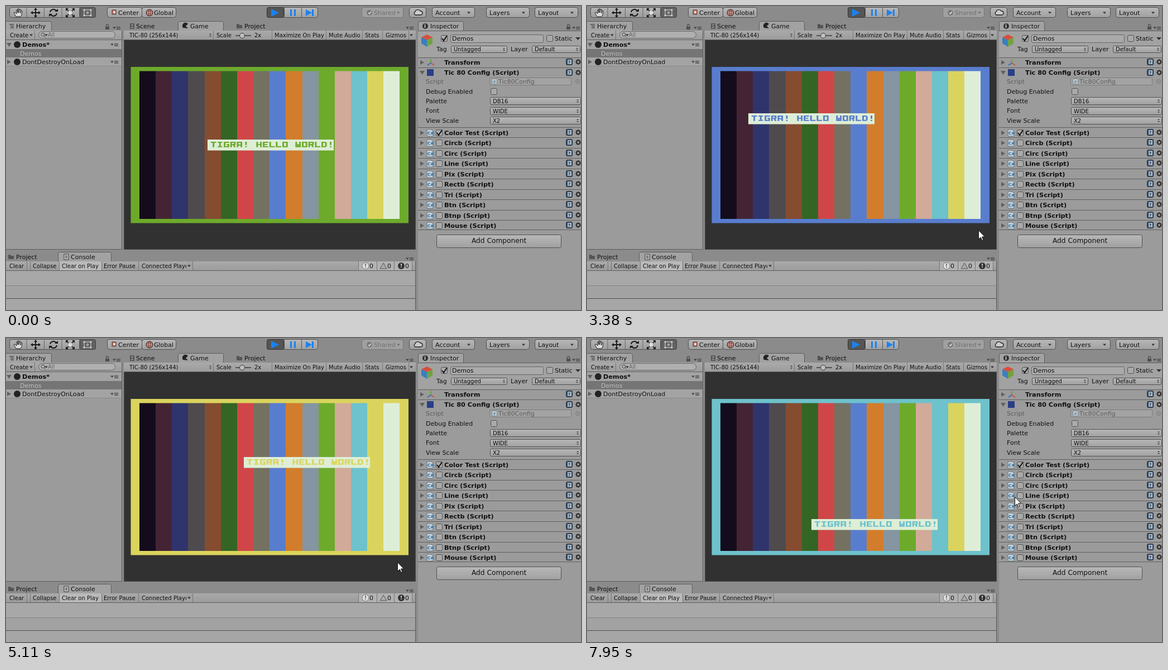
Write an HTML page with a canvas that moves like this. It is 1030 px wide and 544 px high and loops after 8 s.

```html
<!DOCTYPE html>
<html lang="en">
<head>
<meta charset="utf-8">
<title>Editor colour test</title>
<style>
html, body { margin: 0; width: 1030px; height: 544px; overflow: hidden; background: #8b8b8b; }
canvas { position: absolute; left: 0; top: 0; }
</style>
</head>
<body>
<canvas id="ui" width="1030" height="544"></canvas>
<canvas id="live" width="1030" height="544"></canvas>
<script>
const ui = document.getElementById('ui').getContext('2d');
const live = document.getElementById('live').getContext('2d');
const INK = '#101010', EDGE = '#5c5c5c', PANEL = '#9b9b9b';

// ---------- drawing helpers for the static editor ----------
function rect(x, y, w, h, fill) { ui.fillStyle = fill; ui.fillRect(x, y, w, h); }

function round(x, y, w, h, r, fill, edge) {
  ui.beginPath();
  ui.roundRect(x + .5, y + .5, w - 1, h - 1, r);
  if (fill) { ui.fillStyle = fill; ui.fill(); }
  if (edge) { ui.strokeStyle = edge; ui.lineWidth = 1; ui.stroke(); }
}

function text(s, x, y, size = 11, color = INK, weight = '') {
  ui.font = `${weight} ${size}px "DejaVu Sans", sans-serif`;
  ui.fillStyle = color;
  ui.fillText(s, x, Math.round(y + size * .36));
}
const bold = (s, x, y) => text(s, x, y, 11.3, INK, 'bold');

function path(d, x, y, fill, edge, width = 1) {
  ui.save();
  ui.translate(x, y);
  const p = new Path2D(d);
  if (fill) { ui.fillStyle = fill; ui.fill(p); }
  if (edge) { ui.strokeStyle = edge; ui.lineWidth = width; ui.stroke(p); }
  ui.restore();
}

function disc(x, y, r, fill, edge, width = 1) {
  path(`M${r} 0A${r} ${r} 0 1 1 ${-r} 0A${r} ${r} 0 1 1 ${r} 0Z`, x, y, fill, edge, width);
}

function shade(y, h, top, bottom) {
  const g = ui.createLinearGradient(0, y, 0, y + h);
  g.addColorStop(0, top);
  g.addColorStop(1, bottom);
  return g;
}
const button = (x, y, w, h, r = 3) => round(x, y, w, h, r, shade(y, h, '#b8b8b8', '#a0a0a0'), '#505050');
const down = (x, y, c = '#333') => path('M-3 -1.5H3L0 2Z', x, y, c);
const right = (x, y) => path('M-3 -4L4 0L-3 4Z', x, y, '#606060');
const unfold = (x, y) => path('M-4 -3H5L.5 4Z', x, y, '#606060');
const upDown = (x, y) => path('M-2 -1L0 -3L2 -1ZM-2 1L0 3L2 1Z', x, y, '#333');

function popup(s, x, y, w, h = 13) {
  button(x, y, w, h, 2);
  text(s, x + 5, y + h / 2, 10);
  upDown(x + w - 6, y + h / 2);
}
function menu(x, y) {
  down(x - 5, y, '#444');
  path('M0 -2H7M0 0H7M0 2H7', x - 1, y + .5, null, '#444');
}
function lock(x, y) {
  rect(x - 3, y, 7, 5, '#505050');
  path('M-2 0V-2A2 2 0 0 1 2 -2V0', x + .5, y, null, '#505050', 1.3);
}
function folder(x, y) { path('M-5 4V-4H-1L0 -2H5V4Z', x, y, '#555'); }

function tab(x, w, y) { round(x, y, w, 19, [3, 3, 0, 0], '#a2a2a2', EDGE); }
function bar(x, y, w) {
  rect(x, y, w, 16, shade(y, 16, '#aaaaaa', '#9c9c9c'));
  rect(x, y + 16, w, 1, EDGE);
}
function check(x, y, on) {
  round(x, y, 12, 12, 2, '#aaaaaa', '#505050');
  if (on) path('M2 5L5 9L11 0', x, y + 1, null, '#111', 2);
}
function gear(x, y) {
  disc(x, y, 3, null, '#303030', 2);
  path('M0 -5V-3M0 3V5M-5 0H-3M3 0H5M-3.5 -3.5L-2 -2M2 2L3.5 3.5M-3.5 3.5L-2 2M2 -2L3.5 -3.5', x, y, null, '#303030', 1.6);
}
function rowEnd(y) {
  round(1003, y - 6, 12, 12, 2, '#344b66', '#25303c');
  rect(1006, y - 4, 7, 8, '#a8b9c8');
  text('?', 1007, y, 7, '#203040', 'bold');
  gear(1025, y);
}
function script(x, y) {
  path('M-5 -6H3L6 -3V6H-5Z', x, y, '#c4d0d8', '#65737c');
  text('C#', x - 4, y + .5, 7, '#1764a0', 'bold');
}

function drawToolbar() {
  const x = 6;
  round(x, 2, 155, 19, 4, shade(2, 19, '#b4b4b4', '#9c9c9c'), '#505050');
  round(132, 2, 29, 19, 3, '#626262', '#404040');
  for (let i = 1; i < 5; i++) rect(5 + i * 31.5, 3, 1, 17, '#666');
  path('M-4 7L-8 0L-6 -1L-3 2V-5L-1 -5V0V-7L1 -7V0L2 -6H4V1L5 -4L7 -3L6 4L4 7Z', 22, 12, '#ddd', '#222');
  path('M0 -7V7M-7 0H7', 53, 12, null, '#181818', 1.8);
  path('M0 -9L3 -5H-3ZM0 9L3 5H-3ZM-9 0L-5 -3V3ZM9 0L5 -3V3Z', 53, 12, '#181818');
  path('M-6 -1A6 6 0 0 1 5 -3M6 1A6 6 0 0 1 -5 3', 85, 12, null, '#181818', 2);
  path('M2 -2H8V-7ZM-2 2H-8V7Z', 85, 12, '#181818');
  path('M-6 -6L6 6M6 -6L-6 6', 115, 12, null, '#181818', 1.5);
  path('M-8 -8H-3L-8 -3ZM8 -8H3L8 -3ZM-8 8H-3L-8 3ZM8 8H3L8 3Z', 115, 12, '#181818');
  rect(112, 9, 6, 6, '#ddd');
  path('M-6 -5H6V5H-6Z', 146, 12, null, '#ddd');
  for (const i of [-6, 6]) for (const j of [-5, 5]) disc(146 + i, 12 + j, 1.5, '#ddd');
  disc(146, 12, 1.5, null, '#ddd');

  button(181, 2, 63, 19, 4);
  button(243, 2, 62, 19, 4);
  path('M-4 -4H3V4H-4Z', 194, 11, '#d36b57', '#444');
  disc(194, 11, 2, '#eee');
  text('Center', 201, 12);
  disc(257, 12, 6, '#8c5149', '#333');
  path('M-5 0H5M0 -5V5M-3 -4Q-5 0 -3 4M3 -4Q5 0 3 4', 257, 12, null, '#d5a49d');
  text('Global', 265, 12);

  button(467, 2, 92, 19, 4);
  round(467, 2, 31, 19, 3, '#555', '#333');
  rect(498, 3, 1, 17, '#555');
  rect(529, 3, 1, 17, '#555');
  path('M-6 -7L8 0L-6 7Z', 481, 12, '#1982f0');
  path('M-5 -6H-2V6H-5ZM2 -6H5V6H2Z', 514, 12, '#1982f0');
  path('M-7 -6L4 0L-7 6ZM4 -6H7V6H4Z', 544, 12, '#1982f0');

  round(637, 2, 75, 19, 4, '#a0a0a0', '#777');
  disc(651, 12, 5, '#777');
  path('M-2 0L0 2L3 -2', 651, 12, null, '#ddd', 1.5);
  text('Shared', 659, 12, 11, '#707070');
  down(703, 12, '#707070');
  button(722, 2, 31, 19, 4);
  path('M-5 4A3.5 3.5 0 0 1 -5 -2A5 5 0 0 1 4 -3A3.5 3.5 0 0 1 5 4Z', 738, 12, '#ccc', '#222', 1.4);
  for (const [s, bx, w] of [['Account', 763, 77], ['Layers', 860, 78], ['Layout', 947, 78]]) {
    button(bx, 2, w, 19, 4);
    text(s, bx + 6, 12);
    down(bx + w - 11, 12);
  }
}

function drawHierarchy() {
  rect(0, 44, 208, 392, PANEL);
  tab(-4, 86, 27);
  path('M0 -3H8M2 0H8M2 3H8', 6, 36, null, '#222');
  text('Hierarchy', 18, 36);
  lock(181, 37);
  menu(199, 39);
  bar(0, 44, 208);
  text('Create', 7, 52, 10);
  down(45, 52);
  rect(51, 44, 1, 16, '#777');
  round(58, 45, 138, 13, 6, '#b0b0b0', '#666');
  disc(66, 51, 3, null, '#444');
  path('M2 2L5 5', 66, 51, null, '#444');
  down(72, 52);
  text('All', 75, 51, 10, '#666');
  rect(0, 61, 208, 16, '#a3a3a3');
  rect(0, 77, 208, 15, '#757575');
  rect(0, 92, 208, 16, '#a3a3a3');
  rect(0, 107, 208, 1, '#898989');
  unfold(5, 69);
  right(5, 100);
  disc(20, 69, 6, '#222');
  disc(20, 100, 6, '#222');
  bold('Demos*', 29, 69);
  text('Demos', 25, 85, 11, '#bdbdbd');
  text('DontDestroyOnLoad', 29, 100);
  menu(195, 69);
  menu(195, 100);
  rect(207, 44, 1, 392, EDGE);
  rect(0, 435, 208, 1, EDGE);
}

function drawGameWindow() {
  tab(308, 82, 27);
  path('M-4 -4H4M-4 0H4M-4 4H4M-3 -4V4M3 -4V4', 226, 36, null, '#333');
  text('Scene', 233, 36);
  path('M-5 3A5 5 0 1 1 4 -4L0 0L4 4Z', 322, 36, '#222');
  text('Game', 330, 36);
  folder(418, 36);
  text('Project', 427, 36);
  menu(724, 39);
  bar(211, 44, 523);
  text('TIC-80 (256x144)', 221, 52, 10);
  upDown(366, 52);
  text('Scale', 377, 52, 10);
  rect(411, 52, 28, 2, '#555');
  disc(423, 53, 4.5, '#c0c0c0', '#333');
  text('2x', 445, 52, 10);
  text('Maximize On Play', 481, 52, 10);
  text('Mute Audio', 578, 52, 10);
  text('Stats', 643, 52, 10);
  text('Gizmos', 680, 52, 10);
  down(726, 52);
  for (const x of [371, 476, 573, 638, 674, 721]) rect(x, 44, 1, 16, '#777');
  rect(211, 61, 523, 375, '#4b4b4b');
  rect(212, 61, 521, 374, '#313131');
}

function drawConsole() {
  tab(93, 96, 440);
  folder(9, 449);
  text('Project', 18, 449);
  path('M-4 -5H4V5H-4ZM-2 -2H2M-2 0H2M-2 2H2', 108, 449, '#ccc', '#333');
  text('Console', 116, 449);
  menu(724, 452);
  bar(0, 457, 734);
  rect(96, 457, 75, 16, '#bababa');
  [['Clear', 6], ['Collapse', 48], ['Clear on Play', 100], ['Error Pause', 175], ['Connected Playe', 243]]
    .forEach(([s, x]) => text(s, x, 465, 10));
  rect(323, 458, 11, 14, '#a2a2a2');
  down(328, 465);
  for (const x of [37, 43, 95, 171, 237, 334, 631, 664, 696, 727]) rect(x, 457, 1, 16, '#777');
  rect(632, 457, 95, 16, '#b2b2b2');
  for (const x of [664, 695]) rect(x, 457, 1, 16, '#777');
  disc(644, 465, 6, '#ddd', '#777');
  text('!', 642, 465, 9, '#555', 'bold');
  path('M0 -5L6 5H-6Z', 676, 465, '#aaa', '#555');
  disc(708, 465, 6, '#333');
  text('!', 706, 465, 9, '#eee', 'bold');
  for (const x of [651, 683, 715]) text('0', x, 465);
  rect(0, 474, 734, 26, '#a8a8a8');
  rect(0, 500, 734, 24, '#a2a2a2');
  rect(0, 524, 734, 20, '#a6a6a6');
  rect(0, 500, 734, 1, '#858585');
  rect(0, 523, 734, 1, '#4f4f4f');
  rect(733, 457, 1, 87, EDGE);
}

function drawInspector() {
  rect(738, 44, 292, 500, PANEL);
  tab(738, 82, 27);
  disc(751, 36, 5, '#303030');
  text('i', 749, 36, 9, '#ddd', 'bold');
  text('Inspector', 760, 36);
  lock(1007, 37);
  menu(1022, 39);
  rect(738, 44, 292, 48, '#a2a2a2');
  rect(738, 44, 292, 1, EDGE);
  path('M0 -11L10 -6L0 -1L-10 -6Z', 754, 62, '#d64f3e');
  path('M-10 -6L0 -1V11L-10 5Z', 754, 62, '#397fc0');
  path('M10 -6L0 -1V11L10 5Z', 754, 62, '#70a340');
  check(779, 52, true);
  round(796, 51, 167, 15, 2, '#aaaaaa', '#666');
  text('Demos', 799, 58);
  check(968, 52);
  text('Static', 983, 58);
  path('M-4 -2H5L.5 3Z', 1024, 58, '#333');
  text('Tag', 771, 77);
  popup('Untagged', 797, 71, 101);
  text('Layer', 904, 77);
  popup('Default', 942, 71, 87);

  const line = y => rect(738, y, 292, 1, '#5f5f5f');
  line(92);
  line(110);
  right(745, 101);
  path('M0 1V-6', 761, 101, null, '#62a436', 2);
  path('M0 1L-6 5', 761, 101, null, '#366bc0', 2);
  path('M0 1L6 5', 761, 101, null, '#c55839', 2);
  bold('Transform', 785, 101);
  rowEnd(100);
  unfold(745, 119);
  rect(754, 113, 12, 12, '#293e86');
  bold('Tic 80 Config (Script)', 785, 119);
  rowEnd(119);

  text('Script', 752, 135, 11, '#5d5d5d');
  round(866, 128, 147, 14, 2, '#a3a3a3', '#7b7b7b');
  round(870, 130, 10, 10, 1, '#c1ccd2', '#718591');
  text('#', 872, 135, 7, '#426f91');
  text('Tic80Config', 882, 135, 11, '#5d5d5d');
  disc(1024, 135, 3.5, null, '#777');
  disc(1024, 135, 1, '#777');
  text('Debug Enabled', 752, 153);
  check(868, 147);
  [['Palette', 'DB16'], ['Font', 'WIDE'], ['View Scale', 'X2']].forEach(([label, value], i) => {
    const y = 170 + i * 17.5;
    text(label, 752, y);
    popup(value, 867, Math.round(y - 7), 163, 14);
  });

  ['Color Test', 'Circb', 'Circ', 'Line', 'Pix', 'Rectb', 'Tri', 'Btn', 'Btnp', 'Mouse'].forEach((name, i) => {
    const y = Math.round(227 + i * 18.45);
    line(y - 10);
    right(745, y);
    script(759, y);
    check(770, y - 6, i === 0);
    bold(name + ' (Script)', 785, y);
    rowEnd(y - 1);
  });
  line(400);
  button(771, 409, 224, 24, 3);
  text('Add Component', 834, 420, 12.2);
}

rect(0, 0, 1030, 544, '#8b8b8b');
drawToolbar();
drawHierarchy();
drawGameWindow();
drawConsole();
drawInspector();

// ---------- game screen and pointer ----------
const PALETTE = ['#140c1c', '#442434', '#30346d', '#4e4a4e', '#854c30', '#346524', '#d04648', '#757161',
  '#597dce', '#d27d2c', '#8595a1', '#6daa2c', '#d2aa99', '#6dc2cb', '#dad45e', '#deeed6'];
const LEFT = 223.5, TOP = 109, UNIT = 497.5 / 256;

// Letter strokes, five units tall; the pen is wider across than down.
const GLYPHS = {
  T: 'M0 .5H3.3M1.65 0V5', I: 'M.3 .5H3M1.65 0V5M.3 4.5H3',
  G: 'M3.3 .5H.5V4.5H2.8V2.5H1.7', R: 'M.5 5V.5H2.8V2.5H.5M2 2.5L2.8 5',
  A: 'M.5 5V.5H2.8V5M.5 3H2.8', '!': 'M1.65 0V3M1.65 4V5',
  H: 'M.5 0V5M2.8 0V5M.5 2.5H2.8', E: 'M3.3 .5H.5V4.5H3.3M.5 2.5H2.8',
  L: 'M.5 0V4.5H3.3', O: 'M.5 .5H2.8V4.5H.5Z',
  W: 'M.5 0V4.5H2.8V0M1.65 2V4.5', D: 'M.5 .5H2.2L2.8 1.2V3.8L2.2 4.5H.5Z'
};
for (const k in GLYPHS) GLYPHS[k] = new Path2D(GLYPHS[k]);
const ARROW = new Path2D('M.5 .5V16.5L4.2 13L6.8 18.5L9 17.5L6.5 12H11.5Z');

// Key points: time, x, y
const LABEL = [[2250, 361, 239], [2770, 313, 239], [2980, 289, 239], [3575, 289, 169], [3950, 332, 169],
  [4740, 426, 169], [5110, 426, 216], [5293, 426, 237], [5624, 387, 276], [6210, 319, 276],
  [6620, 319, 324], [7310, 402, 324]];
const POINTER = [[540, 858, 500], [620, 790, 440], [700, 695, 378], [800, 640, 347], [1050, 640, 347],
  [1130, 654, 349], [1260, 654, 349], [1280, 655, 349], [1660, 655, 349], [1860, 684, 378], [2060, 701, 401],
  [7580, 701, 401], [7780, 733, 345], [7950, 766, 284]];

function along(keys, t) {
  const i = keys.findIndex(k => k[0] > t);
  if (i === 0) return keys[0].slice(1);
  if (i < 0) return keys.at(-1).slice(1);
  const [t0, x0, y0] = keys[i - 1], [t1, x1, y1] = keys[i];
  const f = (t - t0) / (t1 - t0);
  return [x0 + (x1 - x0) * f, y0 + (y1 - y0) * f];
}

function drawScreen(t) {
  const step = 47.36;
  const held = t < 2290 ? 0 : 2290 + Math.floor((t - 2290) / step + .1) * step;
  const [x, y] = along(LABEL, t >= 7310 ? t : held);
  const color = PALETTE[Math.floor(((x - LEFT) / UNIT + 68) / 12)];
  live.fillStyle = color;
  live.fillRect(LEFT, TOP, 256 * UNIT, 279.5);
  PALETTE.forEach((c, i) => {
    const a = Math.round(LEFT + (8 + i * 15) * UNIT), b = Math.round(LEFT + (23 + i * 15) * UNIT);
    live.fillStyle = c;
    live.fillRect(a, 116.5, b - a, 264.5);
  });
  live.fillStyle = PALETTE[15];
  live.fillRect(Math.round(x), Math.round(y), 226, 19.5);
  live.strokeStyle = color;
  live.lineWidth = 1;
  [...'TIGRA! HELLO WORLD!'].forEach((ch, i) => {
    if (!GLYPHS[ch]) return;
    live.save();
    live.translate(Math.round(x) + (3 + i * 6) * UNIT, Math.round(y) + 4);
    live.scale(UNIT * 1.5, UNIT);
    live.stroke(GLYPHS[ch]);
    live.restore();
  });
}

function drawPointer(t) {
  if (t < 540) return;
  const [x, y] = along(POINTER, t);
  live.save();
  live.translate(Math.round(x), Math.round(y));
  live.fillStyle = '#fff';
  live.strokeStyle = '#111';
  live.lineWidth = 1;
  live.fill(ARROW);
  live.stroke(ARROW);
  live.restore();
}

const start = performance.now();
function frame() {
  const t = (performance.now() - start) % 8000;
  live.clearRect(0, 0, 1030, 544);
  drawScreen(t);
  drawPointer(t);
  requestAnimationFrame(frame);
}
frame();
</script>
</body>
</html>
```
